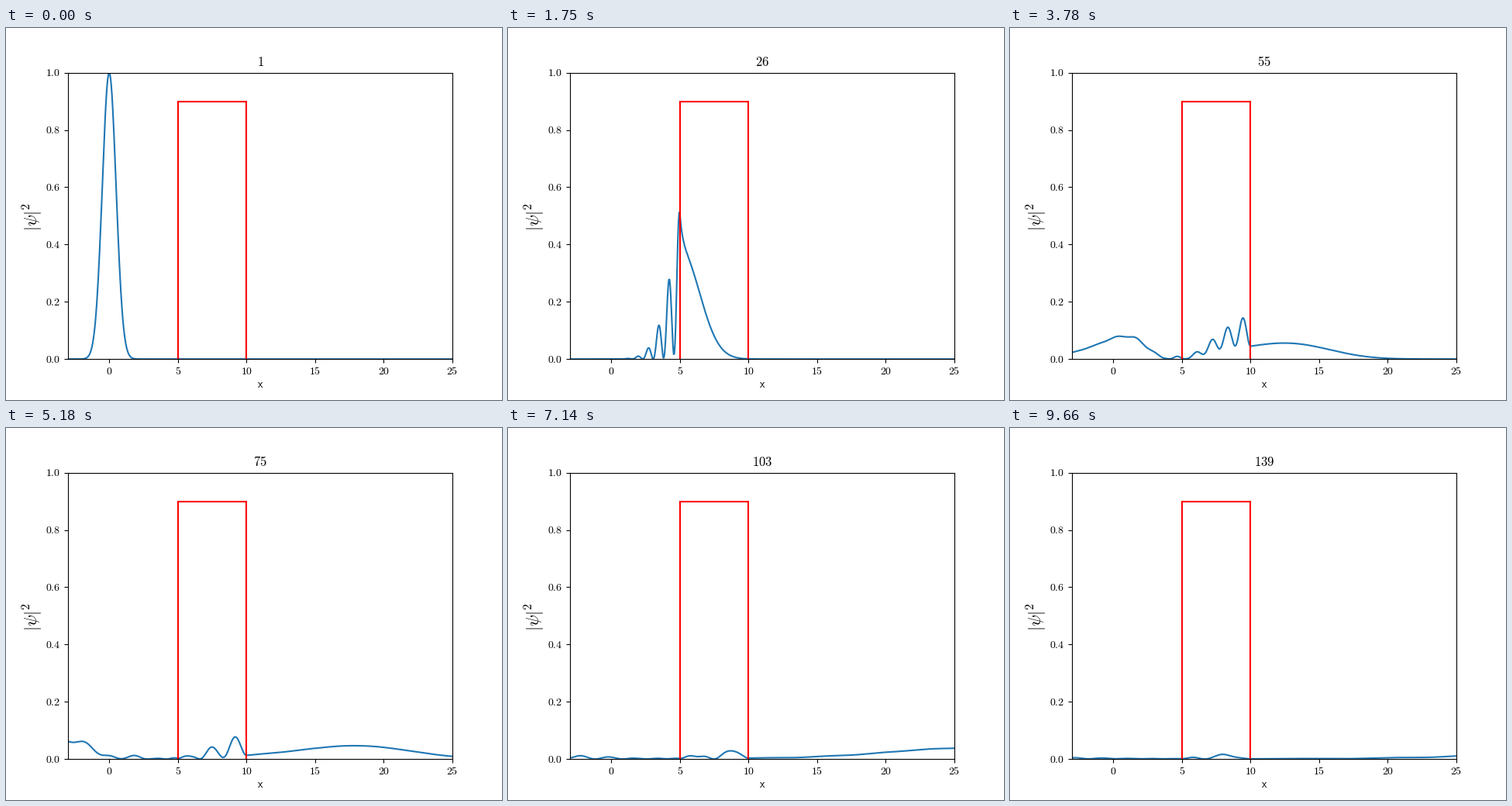
A matplotlib script for the animation above (9.73 s loop, 640 by 480 pixels).

```python
import numpy as np
import matplotlib.pyplot as plt
from matplotlib.animation import FuncAnimation

plt.rcParams["mathtext.fontset"] = "cm"

W, H, DPI = 640, 480, 100
FRAMES, INTERVAL = 139, 70

# Wave packet and square barrier (hbar = m = 1)
K0, V0 = 5.0, 10.0
LEFT, RIGHT = 5.0, 10.0
N, DX = 4096, 0.05
DT, STEPS = 0.002, 25

x = (np.arange(N) - 1600) * DX
k = 2 * np.pi * np.fft.fftfreq(N, DX)


def barrier():
    inside = (x > LEFT + DX / 2) & (x < RIGHT - DX / 2)
    edge = np.isclose(x, LEFT) | np.isclose(x, RIGHT)
    return V0 * (inside + 0.5 * edge)


def evolve():
    """Split-step evolution; returns |psi|^2 for every frame."""
    half_kick = np.exp(-0.5j * barrier() * DT)
    kick = half_kick ** 2
    drift = np.exp(-0.5j * k ** 2 * DT)
    psi = np.exp(-x ** 2 + 1j * K0 * x)
    shown = (x >= -4) & (x <= 26)
    out = [np.abs(psi[shown]) ** 2]
    psi = psi / np.sqrt(np.sum(np.abs(psi) ** 2) * DX)
    for _ in range(FRAMES - 1):
        psi = psi * half_kick
        for step in range(STEPS):
            psi = np.fft.ifft(drift * np.fft.fft(psi))
            psi *= half_kick if step == STEPS - 1 else kick
        out.append(np.abs(psi[shown]) ** 2)
    return x[shown], out


xs, density = evolve()

fig = plt.figure(figsize=(W / DPI, H / DPI), dpi=DPI, facecolor="white")
ax = fig.add_axes([0.125, 0.11, 0.775, 0.77])
ax.set_xlim(-3, 25)
ax.set_ylim(0, 1)
xticks = np.arange(0, 26, 5)
yticks = np.linspace(0, 1, 6)
ax.set_xticks(xticks, [""] * len(xticks))
ax.set_yticks(yticks, [""] * len(yticks))


def put(px, py, text, size=10, ha="center", **kw):
    """Text with its baseline at a pixel position, measured from the top left."""
    return fig.text(px / W, 1 - py / H, text, size=size, ha=ha,
                    va="baseline", **kw)


for v in xticks:
    put(80 + (v + 3) * 496 / 28, 447, f"${v}$")
for v in yticks:
    put(70.6, 427.2 - v * 369.6 + 4.4, f"${v:.1f}$", ha="right")
put(328, 464, r"$\mathsf{x}$")
put(41, 243.5, r"$|\psi|^2$", size=16, rotation=90, rotation_mode="anchor")
title = put(328, 49.3, "", size=12)

curve, = ax.plot([], [], color="C0", lw=1.5)
ax.plot([LEFT, LEFT, RIGHT, RIGHT], [0, 0.9, 0.9, 0], color="red", lw=1.5,
        solid_joinstyle="miter", solid_capstyle="butt")


def draw(i):
    curve.set_data(xs, density[i])
    title.set_text(rf"$\mathsf{{{i + 1}}}$")
    return curve, title


anim = FuncAnimation(fig, draw, frames=FRAMES, interval=INTERVAL,
                     init_func=lambda: draw(0), repeat=True, repeat_delay=0)
plt.show()
```
